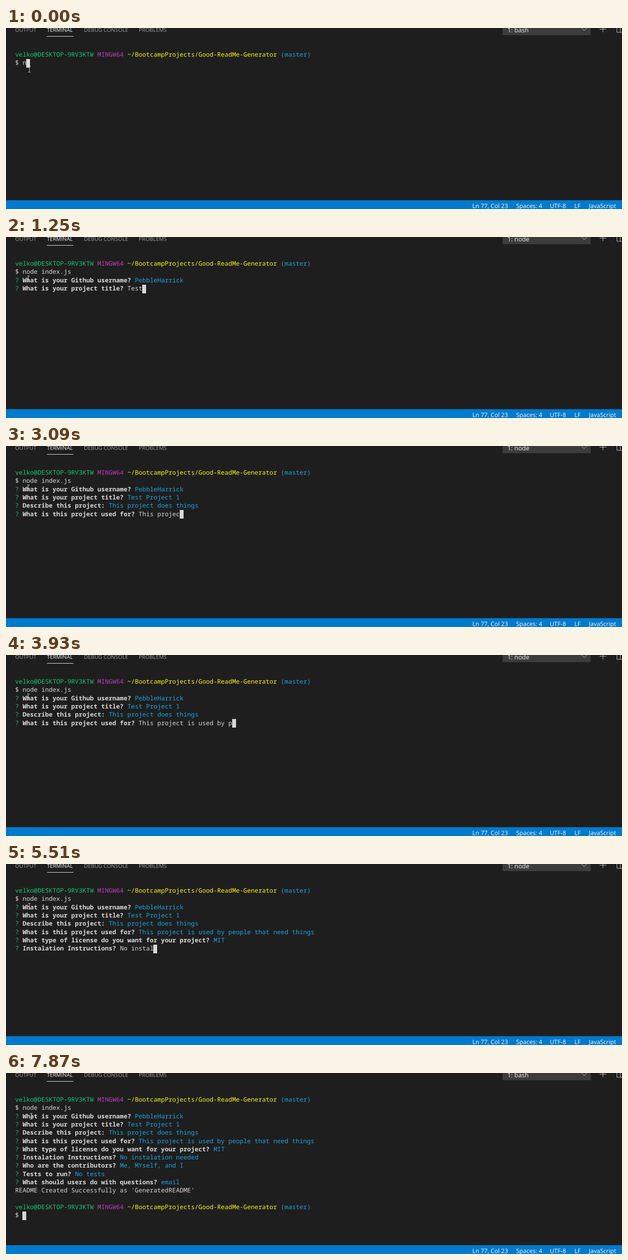
Recreate the animation shown at these times as an HTML page. Size 1280 px wide and 379 px high, loop 8 s.

```html
<!DOCTYPE html>
<html lang="en">
<head>
<meta charset="utf-8">
<title>Terminal</title>
<style>
  html, body { margin: 0; width: 100%; height: 100%; overflow: hidden; background: #1e1e1e; }
  svg { display: block; width: 1280px; height: 379px; }
  text { white-space: pre; text-rendering: geometricPrecision; }
  .ui { font-family: "Open Sans", "Noto Sans", sans-serif; font-size: 12.5px; fill: #fff; }
  .tab { font-size: 11.2px; fill: #a0a0a0; }
  .active { fill: #f0f0f0; }
  .pick { font-size: 13.1px; fill: #f5f5f5; }
  #term { font-family: "Noto Sans Mono", "DejaVu Sans Mono", monospace; font-size: 12.96px; font-weight: 500; }
  .line { fill: none; stroke: #c5c5c5; }
</style>
</head>
<body>
<svg viewBox="0 0 1280 379">
  <rect width="1280" height="379" fill="#1e1e1e"/>
  <g class="ui">
    <text class="tab" x="19" y="8">OUTPUT</text>
    <text class="tab active" x="85" y="8">TERMINAL</text>
    <text class="tab" x="162" y="8">DEBUG CONSOLE</text>
    <text class="tab" x="276" y="8">PROBLEMS</text>
    <rect x="85" y="17" width="55" height="1" fill="#e7e7e7"/>
    <rect x="1032" width="183" height="15" fill="#3c3c3c"/>
    <text class="pick" x="1042" y="9" id="shell"></text>
  </g>
  <path class="line" d="M1196.5 .5l5 5 5-5"/>
  <path class="line" d="M1233.5 2.5h14M1240.5 -4v13M1269.5 -4v13h14M1276.5 -4v13"/>
  <rect y="360.5" width="1280" height="19" fill="#007acc"/>
  <g class="ui">
    <text x="969" y="377">Ln 77, Col 23</text>
    <text x="1060" y="377">Spaces: 4</text>
    <text x="1130" y="377">UTF-8</text>
    <text x="1181" y="377">LF</text>
    <text x="1211" y="377">JavaScript</text>
  </g>
  <g id="term"></g>
  <path id="mouse" fill="none" stroke="#d8d8d8" d="M-2.5 -6h2l.5 .5 .5-.5h2M-2.5 6h2l.5-.5 .5 .5h2M0 -5.5v11"/>
</svg>
<script>
const LOOP = 8000, TICK = 154, SPEED = 0.028; // ms, ms, characters per ms
const CELL = 7.776, ROW = 17.28, LEFT = 19, TOP = 48;
const GREEN = '#14c67c', CYAN = '#1ba6dc', PURPLE = '#bc3fbc', YELLOW = '#f5f51c', TEXT = '#d8d8d8';

// Every prompt opens at `start` and its answer is typed at a steady speed.
const session = [
  { answer: 'node index.js', start: -40 },
  { title: 'What is your Github username?', answer: 'PebbleHarrick', start: 600 },
  { title: 'What is your project title?', answer: 'Test Project 1', start: 1090 },
  { title: 'Describe this project:', answer: 'This project does things', start: 1650 },
  { title: 'What is this project used for?', answer: 'This project is used by people that need things', start: 2470, speed: 0.018 },
  { title: 'What type of license do you want for your project?', answer: 'MIT', start: 4770, choices: ['MIT', 'Apache 2.0', 'GPL v3'] },
  { title: 'Instalation Instructions?', answer: 'No instalation needed', start: 5069 },
  { title: 'Who are the contributors?', answer: 'Me, MYself, and I', start: 6205 },
  { title: 'Tests to run?', answer: 'No tests', start: 7040 },
  { title: 'What should users do with questions?', answer: 'email', start: 7400 }
];
const END = 7750;

const mousePath = [
  { from: 0, at: '48.5 86.5' }, { from: 460, at: '46.5 87.5' },
  { from: 5050, at: '48.5 88.5' }, { from: 7380, at: '52.5 90.5' }
];

const term = document.getElementById('term');
const shell = document.getElementById('shell');
const mouse = document.getElementById('mouse');

function add(tag, attrs, content = '') {
  const el = document.createElementNS('http://www.w3.org/2000/svg', tag);
  for (const name in attrs) el.setAttribute(name, attrs[name]);
  el.textContent = content;
  term.append(el);
}

// Writes [text, colour, bold] runs on a row and returns the next column.
function write(row, ...runs) {
  let col = 0;
  for (const [str, fill = TEXT, bold] of runs) {
    const attrs = { x: LEFT + col * CELL, y: Math.round(TOP + 12.1 + row * ROW), fill };
    if (bold) attrs['font-weight'] = 700;
    add('text', attrs, str);
    col += str.length;
  }
  return col;
}

function block(row, col) {
  add('rect', { x: Math.floor(LEFT + col * CELL), y: Math.round(TOP + row * ROW), width: 8, height: 18, fill: TEXT });
}

function prompt(row) {
  write(row, ['velko@DESKTOP-9RV3KTW ', GREEN], ['MINGW64 ', PURPLE],
    ['~/BootcampProjects/Good-ReadMe-Generator ', YELLOW], ['(master)', CYAN]);
}

function ask(row, title, ...rest) {
  return write(row, ['? ', GREEN], [title + ' ', TEXT, true], ...rest);
}

function choose(row, title, choices, picked) {
  const hint = [['(Press '], ['<space>', CYAN, true], [' to select, '], ['<a>', CYAN, true],
    [' to toggle all, '], ['<i>', CYAN, true], [' to invert selection)']];
  ask(row, title, ...(picked ? [] : hint));
  choices.forEach((name, i) => write(row + 1 + i,
    [i ? ' ' : '>', CYAN], picked && !i ? ['(*)', GREEN] : ['( )'], [' ' + name]));
}

function drawEntry({ title, answer, start, speed = SPEED, choices }, row, active, t) {
  const typed = active ? answer.slice(0, Math.round((t - start) * speed)) : answer;
  if (active && choices) return choose(row, title, choices, t - start > 100);
  const end = title ? ask(row, title, [typed, active ? TEXT : CYAN]) : write(row, ['$ '], [typed]);
  if (active) block(row, end);
}

function draw(t) {
  const done = t >= END;
  const open = session.filter(entry => entry.start <= t);
  term.replaceChildren();
  shell.textContent = open.length > 1 && !done ? '1: node' : '1: bash';
  prompt(0);
  open.forEach((entry, i) => drawEntry(entry, i + 1, !done && i === open.length - 1, t));
  if (done) {
    const row = session.length + 1;
    write(row, ["README Created Successfully as 'GeneratedREADME'"]);
    prompt(row + 2);
    block(row + 3, write(row + 3, ['$ ']));
  }
  mouse.setAttribute('transform', `translate(${mousePath.findLast(p => p.from <= t).at})`);
}

let shown = -1;
function tick() {
  const step = Math.floor(performance.now() % LOOP / TICK);
  if (step !== shown) draw((shown = step) * TICK);
  requestAnimationFrame(tick);
}
tick();
</script>
</body>
</html>
```
